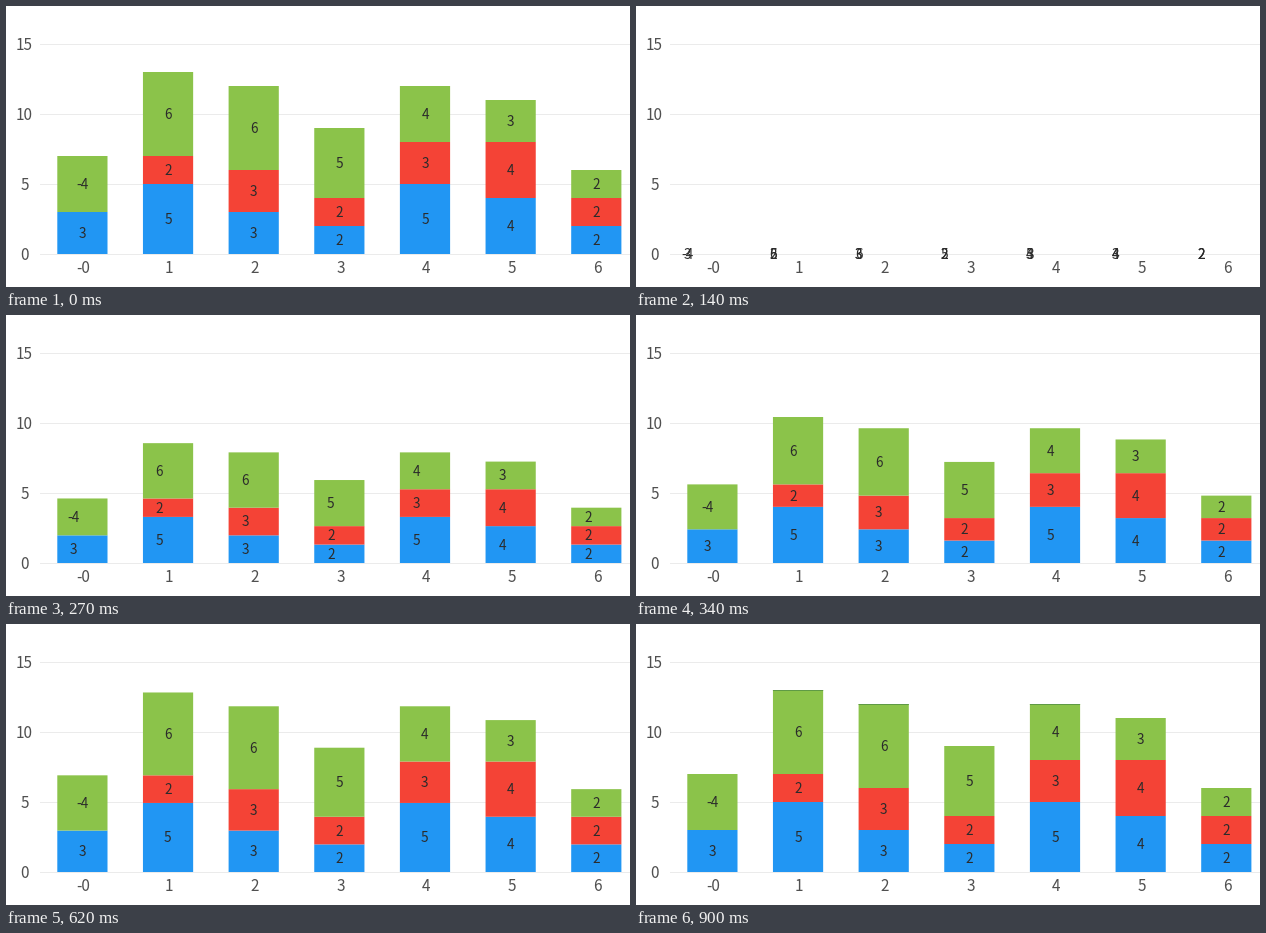
These frames come from a looping animation (624 by 281 pixels, 2.1 s). A matplotlib script:

```python
import matplotlib.pyplot as plt
from matplotlib.animation import FuncAnimation
from matplotlib.patches import Rectangle

W, H, DPI = 624, 281, 100
LOOP, STEP = 2100, 10

BASE, UNIT = 248, 14            # y of zero, pixels per value
FIRST, PITCH, BAR = 76.4, 85.65, 50.2
DURATION = 800                  # length of the growth in ms

SERIES = [
    ("#2196F3", [3, 5, 3, 2, 5, 4, 2]),
    ("#F44336", [0, 2, 3, 2, 3, 4, 2]),
    ("#8BC34A", [4, 6, 6, 5, 4, 3, 2]),
]
CAPPED = (1, 2, 4)              # columns with a thin dark top edge at rest

# (screen time, animation age) of every repaint while the bars grow
REPAINTS = [(140, 0), (210, 62), (270, 124), (340, 187), (400, 264),
            (480, 341), (550, 418), (620, 496), (690, 575), (760, 650),
            (830, 720), (900, DURATION)]

plt.rcParams["font.family"] = ["Noto Sans CJK JP", "DejaVu Sans"]

fig = plt.figure(figsize=(W / DPI, H / DPI), dpi=DPI, facecolor="white")
ax = fig.add_axes([0, 0, 1, 1])
ax.set_xlim(0, W)
ax.set_ylim(H, 0)
ax.axis("off")


def label(x, y, text, px, color):
    """Text whose digits are centred on (x, y)."""
    art = ax.text(x, y, text, fontsize=px * 72 / DPI, color=color,
                  ha="center", va="baseline", zorder=4)
    art.drop = px * 0.733 / 2
    art.set_y(y + art.drop)
    return art


def rect(x, y, w, h, color, z):
    return ax.add_patch(Rectangle((x, y), w, h, facecolor=color, linewidth=0,
                                  snap=False, zorder=z))


def ease_out(age):
    t = age / DURATION
    return 1 if t >= 1 else 1 - 2 ** (-10 * t)


parts = []                      # everything that vanishes in the blank moment
for value in (0, 5, 10, 15):
    y = BASE - value * UNIT
    parts.append(rect(34, y, W - 34, 1, "#EBEBEB", 1))
    parts.append(label(18.4, y + 0.5, str(value), 15.3, "#505050"))

bars, tags, caps = [], [], []
for col in range(7):
    cx = FIRST + col * PITCH
    left = cx - BAR / 2
    name = "-0" if col == 0 else str(col)
    parts.append(label(cx + 1, 261.5, name, 15.3, "#505050"))
    below = 0
    for color, values in SERIES:
        value = values[col]
        if value:
            bars.append((rect(left, BASE, BAR, 0, color, 2), below, value))
            text = "-4" if col == 0 and below else str(value)
            tags.append((label(cx, BASE, text, 13.6, "#2B2B2B"),
                         left, below + value / 2))
        below += value
    if col in CAPPED:
        caps.append(rect(left, BASE - below * UNIT, BAR, 1, "#5F9A45", 3))

parts += [b[0] for b in bars] + [t[0] for t in tags]


def progress(ms):
    """Share of full height, or None while the chart is blank."""
    if ms < 70:
        return 1
    age = None
    for start, a in REPAINTS:
        if ms >= start:
            age = a
    return None if age is None else ease_out(age)


def draw(i):
    ms = i * STEP
    p = progress(ms)
    for part in parts:
        part.set_visible(p is not None)
    for cap in caps:
        cap.set_visible(ms >= REPAINTS[-1][0])
    if p is not None:
        scale = UNIT * p
        for bar, below, value in bars:
            bar.set_y(BASE - (below + value) * scale)
            bar.set_height(value * scale)
        for tag, left, mid in tags:
            tag.set_position((left + p * BAR / 2,
                              BASE - mid * scale + tag.drop))
    return parts + caps


anim = FuncAnimation(fig, draw, frames=LOOP // STEP, interval=STEP,
                     repeat=True, repeat_delay=0)
plt.show()
```
